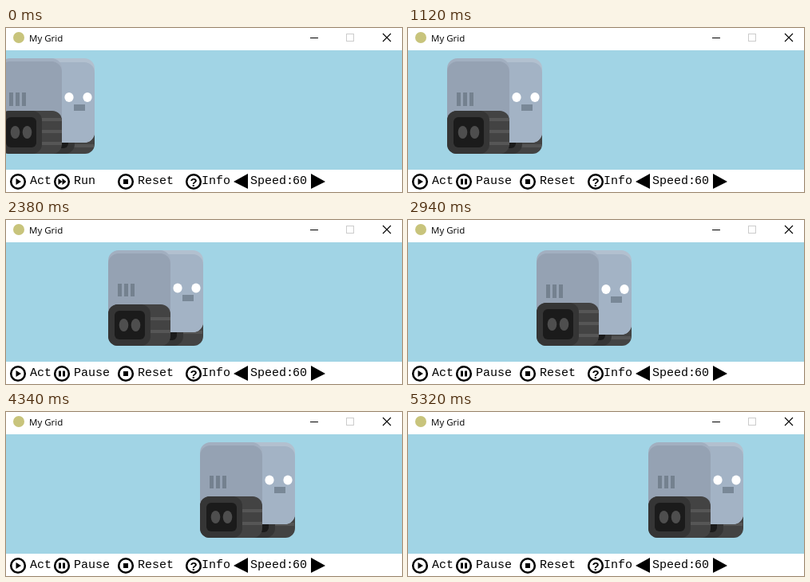
Recreate the animation shown at these times as an HTML page. Size 496 by 206 pixels, loop 5360 ms.

```html
<!DOCTYPE html>
<html lang="en">
<head>
<meta charset="utf-8">
<title>My Grid</title>
<style>
  html, body { margin: 0; width: 100%; height: 100%; overflow: hidden; background: #fff; }
  svg { display: block; width: 496px; height: 206px; }
  .title { font: 11.5px "Open Sans", "Noto Sans", sans-serif; }
  .bar { font: 15px "Liberation Mono", "Courier New", monospace; }
  .ring { fill: #fff; stroke: #000; stroke-width: 2.5; }
  .mark { font: bold 15px "Liberation Sans", sans-serif; text-anchor: middle; }
</style>
</head>
<body>
<svg viewBox="0 0 496 206">
  <rect width="496" height="206" fill="#fff"/>
  <rect y="28" width="496" height="150" fill="#a1d4e5"/>
  <g id="robot"><g id="poseA"></g><g id="poseB"></g></g>

  <circle cx="16" cy="12" r="7" fill="#c8c47c"/>
  <text class="title" x="29" y="17">My Grid</text>
  <g fill="none" stroke="#000">
    <path d="M381 12.5H391"/>
    <rect x="426.5" y="7.5" width="9" height="9" stroke="#ccc"/>
    <path d="M472 7L482 17M482 7L472 17" stroke-width="1.1"/>
  </g>

  <circle class="ring" cx="15" cy="193" r="8.8"/>
  <path d="M12.5 189L19 193L12.5 197Z"/>
  <circle class="ring" cx="70" cy="193" r="8.8"/>
  <path id="runIcon"/>
  <circle class="ring" cx="150" cy="193" r="8.8"/>
  <rect x="147" y="190" width="6" height="6"/>
  <circle class="ring" cx="235" cy="193" r="8.8"/>
  <text class="mark" x="235" y="198.5">?</text>
  <path d="M285 193L303 183V202ZM382 183L400 193L382 202Z"/>
  <g class="bar">
    <text x="30" y="196">Act</text>
    <text id="runLabel" x="85" y="196"></text>
    <text x="165" y="196">Reset</text>
    <text x="245" y="196">Info</text>
    <text x="306" y="196">Speed:</text>
    <text x="359" y="196">60</text>
  </g>
</svg>
<script>
const LOOP = 5360, HOLD = 280, STEP = 140;
// [step, robot left edge]
const PATH = [[0, -8], [7, 49], [11, 86], [20, 161], [26, 210], [30, 243], [37, 301]];
const byId = id => document.getElementById(id);

const rect = (x, y, right, bottom, fill, r = 0) =>
  `<rect x="${x}" y="${y}" width="${right - x}" height="${bottom - y}" rx="${r}" fill="${fill}"/>`;
const oval = (x, y, rx, ry, fill) =>
  `<ellipse cx="${x}" cy="${y}" rx="${rx}" ry="${ry}" fill="${fill}"/>`;

function drawPose({ bodyEnd, eyeY, mouthY, ventY, ventEnd, treadY, bands, rearBands }) {
  const wheelY = (treadY + 158) / 2;
  return [
    // rear track
    rect(42, 110, 119, 158, '#434343', 12),
    ...rearBands.map(y => rect(84, y, 118, y + 4, '#545454')),
    rect(42, 110, 94, 158, '#353535', 12),
    rect(50, 118, 86, 151, '#1b1b1b', 6),
    // head
    rect(20, 38, 119, bodyEnd, '#b2c0cf', 13),
    rect(20, 43, 119, bodyEnd, '#a3b3c5', 13),
    oval(87, eyeY, 5.6, 6, '#fff'),
    oval(110, eyeY, 5.6, 6, '#fff'),
    rect(93, mouthY, 107, mouthY + 8, '#798897'),
    // side panel
    rect(0, 38, 78, 130, '#a2afc0', 13),
    rect(0, 42, 78, 130, '#95a2b3', 13),
    ...[12, 20, 28].map(x => rect(x, ventY, x + 5, ventEnd, '#74818f')),
    // front track
    rect(0, treadY, 78, 158, '#434343', 12),
    ...bands.map(y => rect(48, y, 78, y + 4, '#565656')),
    rect(0, treadY, 53, 158, '#353535', 12),
    rect(8, treadY + 8, 46, 150, '#1b1b1b', 6),
    oval(19.5, wheelY, 5.8, 8, '#4e4e4e'),
    oval(34.5, wheelY, 5.8, 8, '#4e4e4e')
  ].join('');
}

byId('poseA').innerHTML = drawPose({
  bodyEnd: 144, eyeY: 87, mouthY: 96, ventY: 81, ventEnd: 98,
  treadY: 104, bands: [113, 128, 143], rearBands: [146]
});
byId('poseB').innerHTML = drawPose({
  bodyEnd: 141, eyeY: 85.5, mouthY: 94, ventY: 80, ventEnd: 96,
  treadY: 106, bands: [122, 138], rearBands: [124, 139]
});

function leftAt(step) {
  const i = Math.max(1, PATH.findIndex(p => p[0] >= step));
  const [s0, x0] = PATH[i - 1], [s1, x1] = PATH[i];
  return Math.round(x0 + (x1 - x0) * (step - s0) / (s1 - s0));
}

function render(time) {
  const t = time % LOOP;
  const running = t >= HOLD;
  const step = running ? Math.min(37, Math.floor((t - HOLD) / STEP) + 1) : 0;
  const x = leftAt(step);
  // the two poses swap every 15 pixels travelled
  const phase = (x + 8) % 30;
  const second = phase >= 3 && phase < 18;
  byId('robot').setAttribute('transform', `translate(${x} 0)`);
  byId('poseA').style.display = second ? 'none' : '';
  byId('poseB').style.display = second ? '' : 'none';
  byId('runLabel').textContent = running ? 'Pause' : 'Run';
  byId('runIcon').setAttribute('d', running
    ? 'M66 189.5H69V196.5H66ZM71 189.5H74V196.5H71Z'
    : 'M65.5 189L70.5 193L65.5 197ZM70.5 189L75.5 193L70.5 197Z');
}

const start = performance.now();
function tick() {
  render(performance.now() - start);
  requestAnimationFrame(tick);
}
tick();
</script>
</body>
</html>
```
